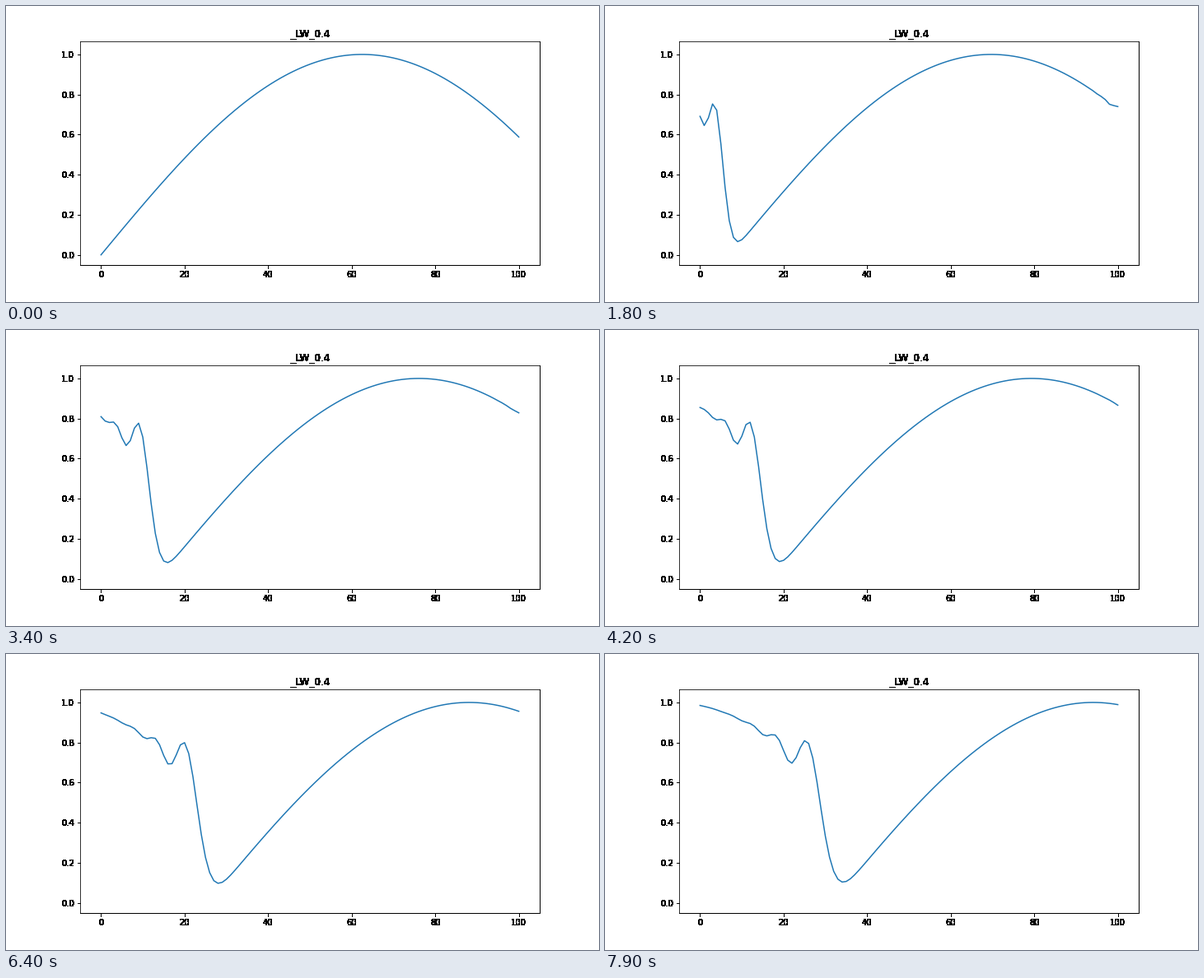
A matplotlib script that plays this animation: 720 by 360 pixels, repeating every 8000 ms.

```python
import matplotlib.pyplot as plt
import numpy as np
from matplotlib.animation import FuncAnimation

COURANT = 0.4
CELLS = 101
FRAMES = 80
PEAK = 1.0137   # leaves room for the scheme's overshoot
MARGIN = 0.05


def lax_wendroff(u, c):
    """Advance periodic linear advection by one step."""
    left, right = np.roll(u, 1), np.roll(u, -1)
    return u - c / 2 * (right - left) + c**2 / 2 * (right - 2 * u + left)


def harden(img, dpi):
    """Turn every touched pixel solid black."""
    out = np.zeros_like(img)
    out[..., 3] = img[..., 3] > 0
    return out, 0, 0


x = np.arange(CELLS)
states = [np.sin(0.8 * np.pi * x / (CELLS - 1))]
while len(states) < FRAMES:
    states.append(lax_wendroff(states[-1], COURANT))

plt.rcParams.update({"font.family": "DejaVu Sans", "font.size": 10})
fig = plt.figure(figsize=(10, 5), dpi=72, facecolor="white")
fig.subplots_adjust(left=0.125, right=0.9, bottom=0.125, top=0.88)
ax = fig.add_subplot()
line, = ax.plot(x, states[0], color="#1f77b4", lw=1.5)
ax.set_xlim(-5, 105)
ax.set_ylim(-MARGIN * PEAK, (1 + MARGIN) * PEAK)
ax.set_title(f"_LW_{COURANT}")

for artist in (ax.xaxis, ax.yaxis, ax.title,
               ax.spines["right"], ax.spines["bottom"]):
    artist.set_agg_filter(harden)


def update(i):
    line.set_ydata(states[i])
    return line,


anim = FuncAnimation(fig, update, frames=FRAMES, interval=100,
                     repeat=True, repeat_delay=0)
plt.show()
```
